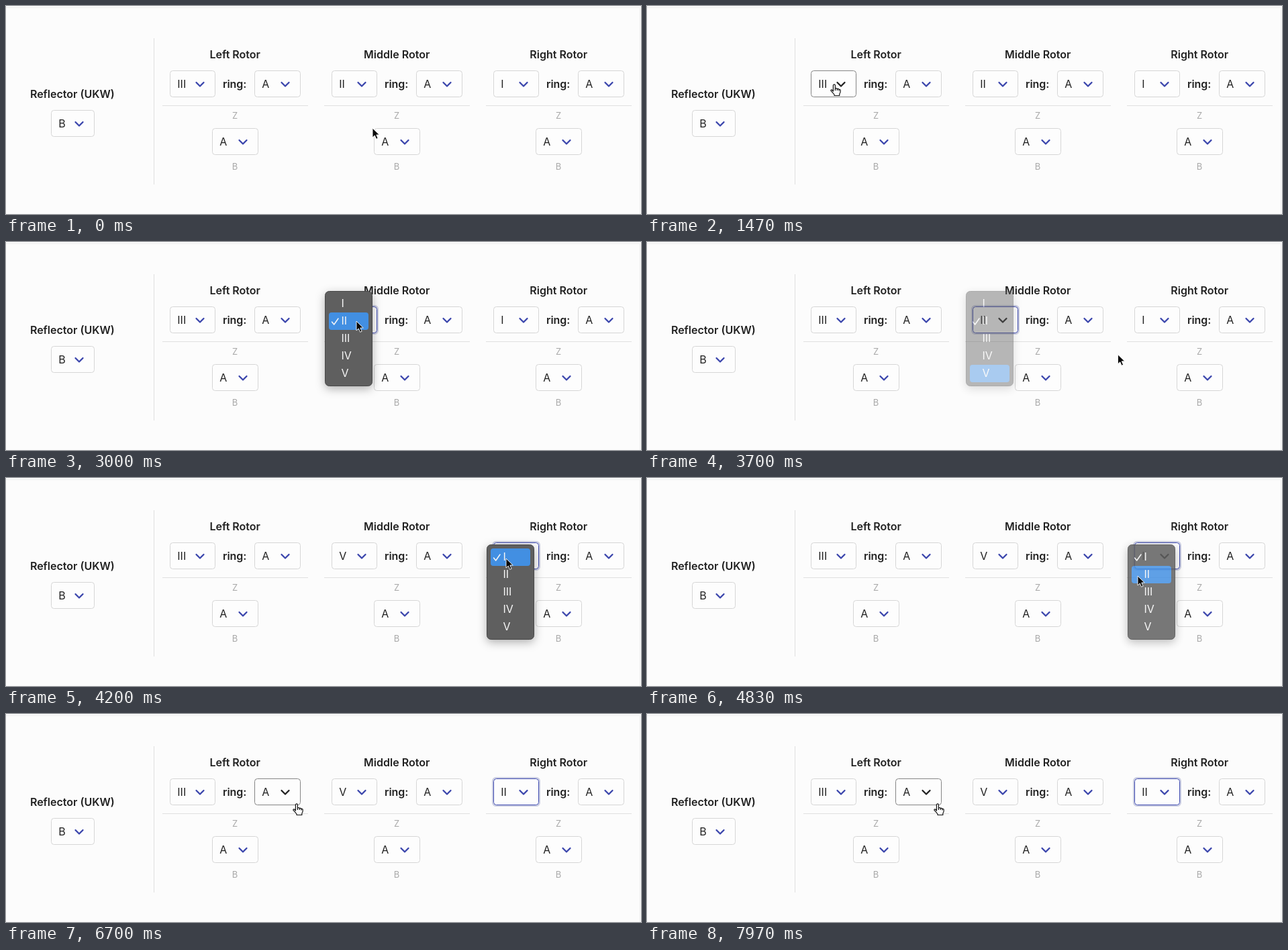
Write an HTML page that moves like this. It is 946 px wide and 310 px high and loops after 8 s.

```html
<!DOCTYPE html>
<html lang="en">
<head>
<meta charset="utf-8">
<title>Rotor settings</title>
<style>
html, body { margin: 0; width: 100%; height: 100%; overflow: hidden; background: #fcfcfc; }
svg { display: block; width: 946px; height: 310px; font: 16px Inter, sans-serif; fill: #212121; }
.bold { font-weight: 600; text-anchor: middle; }
.small { font-size: 13px; text-anchor: middle; fill: #a9a9a9; }
.line { fill: none; stroke: #e0e0e0; }
.edge { fill: none; stroke: #eeeeee; }
.box { fill: #fdfdfd; stroke: #d6d6d6; }
.halo { fill: none; stroke: #8088b8; stroke-opacity: .4; stroke-width: 2; visibility: hidden; }
.chevron { fill: none; stroke: #3a45ac; stroke-width: 2.3; stroke-linecap: round; stroke-linejoin: round; }
.hover .box { stroke: #858585; }
.hover .chevron { stroke: #212121; }
.focus .box { stroke: #3f4bb0; }
.focus .halo { visibility: visible; }
.panel { fill: #5f5f5f; stroke: #484848; filter: drop-shadow(0 4px 7px rgba(0, 0, 0, .3)); }
.mark { fill: #428fe2; }
.item { fill: #f6f6f6; }
.tick { fill: none; stroke: #f6f6f6; stroke-width: 1.5; stroke-linecap: round; stroke-linejoin: round; }
.arrow { fill: #080808; stroke: #fcfcfc; stroke-width: .9; }
.hand { fill: #fcfcfc; stroke: #101010; stroke-width: 1.2; stroke-linejoin: round; }
</style>
</head>
<body>
<svg id="stage" viewBox="0 0 946 310"></svg>
<script>
const LOOP = 8000, FADE = 200, ROW = 26, PITCH = 241;
const NUMERALS = ["I", "II", "III", "IV", "V"];
const stage = document.getElementById("stage");

function add(parent, tag, attrs, text) {
  const node = document.createElementNS("http://www.w3.org/2000/svg", tag);
  for (const key in attrs) node.setAttribute(key, attrs[key]);
  if (text) node.textContent = text;
  return parent.appendChild(node);
}
const label = (parent, cls, x, y, text) => add(parent, "text", { class: cls, x, y }, text);
const path = (parent, cls, d) => add(parent, "path", { class: cls, d });
const rect = (parent, cls, x, y, width, height, rx) =>
  add(parent, "rect", { class: cls, x, y, width, height, rx });

const selects = [];
function addSelect(x, y, w, value) {
  const g = add(stage, "g", {});
  rect(g, "halo", x - 1, y - 1, w + 2, 42, 5);
  rect(g, "box", x + .5, y + .5, w - 1, 39, 4);
  const text = label(g, "", x + 11.3, y + 26, value);
  path(g, "chevron", `M${x + w - 28.5} ${y + 18}l5.5 5.5 5.5 -5.5`);
  const select = { g, x, y, w, text };
  selects.push(select);
  return select;
}

path(stage, "edge", "M0 2.5H944.5V310");
path(stage, "line", "M220.5 48V266");
label(stage, "bold", 98.8, 137, "Reflector (UKW)");
addSelect(67, 155, 65, "B");

const rotors = ["Left", "Middle", "Right"].map((side, i) => {
  const x = i * PITCH;
  label(stage, "bold", x + 341.2, 78, side + " Rotor");
  label(stage, "bold", x + 340.7, 122, "ring:");
  path(stage, "line", `M${x + 233} 148.5H${x + 450}`);
  label(stage, "small", x + 341, 168, "Z");
  label(stage, "small", x + 341, 244, "B");
  addSelect(x + 370, 96, 69, "A");
  addSelect(x + 307, 182, 69, "A");
  return addSelect(x + 244, 96, 68, NUMERALS[2 - i]);
});

function addMenu(rotor, from, pick, open, click, fade) {
  const select = rotors[rotor], x = select.x - 10, y = 99 - ROW * from;
  const g = add(stage, "g", {});
  rect(g, "panel", x + .5, y + .5, 70, 141, 6);
  const mark = rect(g, "mark", x + 6, 0, 59, 26, 4);
  NUMERALS.forEach((n, i) => label(g, "item", x + 24.5, y + 24 + ROW * i, n));
  path(g, "tick", `M${x + 10.5} 119l3.2 4 6.3 -9`);
  return { g, select, mark, x, y, from, pick, open, click, fade };
}
const menus = [
  addMenu(0, 2, 2, 1800, 2250, 2440),
  addMenu(1, 1, 4, 2950, 3430, 3590),
  addMenu(2, 0, 1, 4080, 4650, 4800)
];

const cursor = add(stage, "g", {});
const arrow = path(cursor, "arrow", "M0 0V14L3.3 11 5.6 16.3 8.1 15.2 5.8 10H10.3Z");
const hand = add(cursor, "g", { class: "hand" });
path(hand, "", "M-1.6 10V1.4A1.5 1.5 0 0 1 1.4 1.4V6Q3.5 5 4.3 6.6 6.3 5.8 7 7.4 9 7 9.2 9 9.4 12 7.8 14V16.5H0V15Q-2 12.5-5 9.4-5.5 7.5-3.5 8Z");
path(hand, "", "M1.4 6V9M4.3 6.6V9M7 7.4V9.5");

// Cursor stops: time, x, y
const stops = [
  [0, 546, 182], [40, 546, 182], [800, 279, 117], [2250, 279, 117],
  [2430, 334, 122], [2850, 522, 118], [3000, 522, 118], [3300, 505, 197],
  [3440, 505, 197], [3700, 701, 168], [3950, 745, 120], [4200, 745, 120],
  [4500, 731, 146], [4830, 731, 146], [5600, 441, 142], [5750, 441, 142],
  [6050, 433, 134], [LOOP, 433, 134]
];
const held = (a, b) => !a || !b || (a[1] === b[1] && a[2] === b[2]);
function slope(i, axis) {
  const a = stops[i - 1], b = stops[i], c = stops[i + 1];
  return held(a, b) || held(b, c) ? 0 : (c[axis] - a[axis]) / (c[0] - a[0]);
}
function cursorAt(t) {
  const i = Math.max(0, stops.findIndex(s => s[0] > t) - 1);
  const a = stops[i], b = stops[i + 1], span = b[0] - a[0], u = (t - a[0]) / span;
  const ease = u * u * (3 - 2 * u);
  return [1, 2].map(k => a[k] + (b[k] - a[k]) * ease +
    span * u * (1 - u) * (slope(i, k) * (1 - u) - slope(i + 1, k) * u));
}

function render(t) {
  const [x, y] = cursorAt(t);
  let active = null, focused = null;
  for (const m of menus) {
    const end = m.fade + FADE, shown = t >= m.open && t < end;
    m.g.style.display = shown ? "" : "none";
    m.select.text.textContent = NUMERALS[t < end ? m.from : m.pick];
    if (t >= m.open) focused = m.select;
    if (!shown) continue;
    active = m;
    m.g.style.opacity = Math.min(1, (end - t) / FADE);
    const row = t >= m.click ? m.pick : Math.floor((y - m.y - 5) / ROW);
    const inside = t >= m.click || (x > m.x && x < m.x + 71 && row >= 0 && row < 5);
    m.mark.style.display = inside ? "" : "none";
    m.mark.setAttribute("y", m.y + 6 + ROW * row);
  }
  const hovered = active ? active.select : selects.find(s =>
    x >= s.x && x < s.x + s.w && y >= s.y && y < s.y + 40);
  for (const s of selects) {
    s.g.classList.toggle("hover", s === hovered);
    s.g.classList.toggle("focus", s === focused);
  }
  const pointing = hovered && !active;
  hand.style.display = pointing ? "" : "none";
  arrow.style.display = pointing ? "none" : "";
  cursor.setAttribute("transform", `translate(${x.toFixed(2)} ${y.toFixed(2)})`);
}

const start = performance.now();
function tick() {
  render((performance.now() - start) % LOOP);
  requestAnimationFrame(tick);
}
tick();
</script>
</body>
</html>
```
